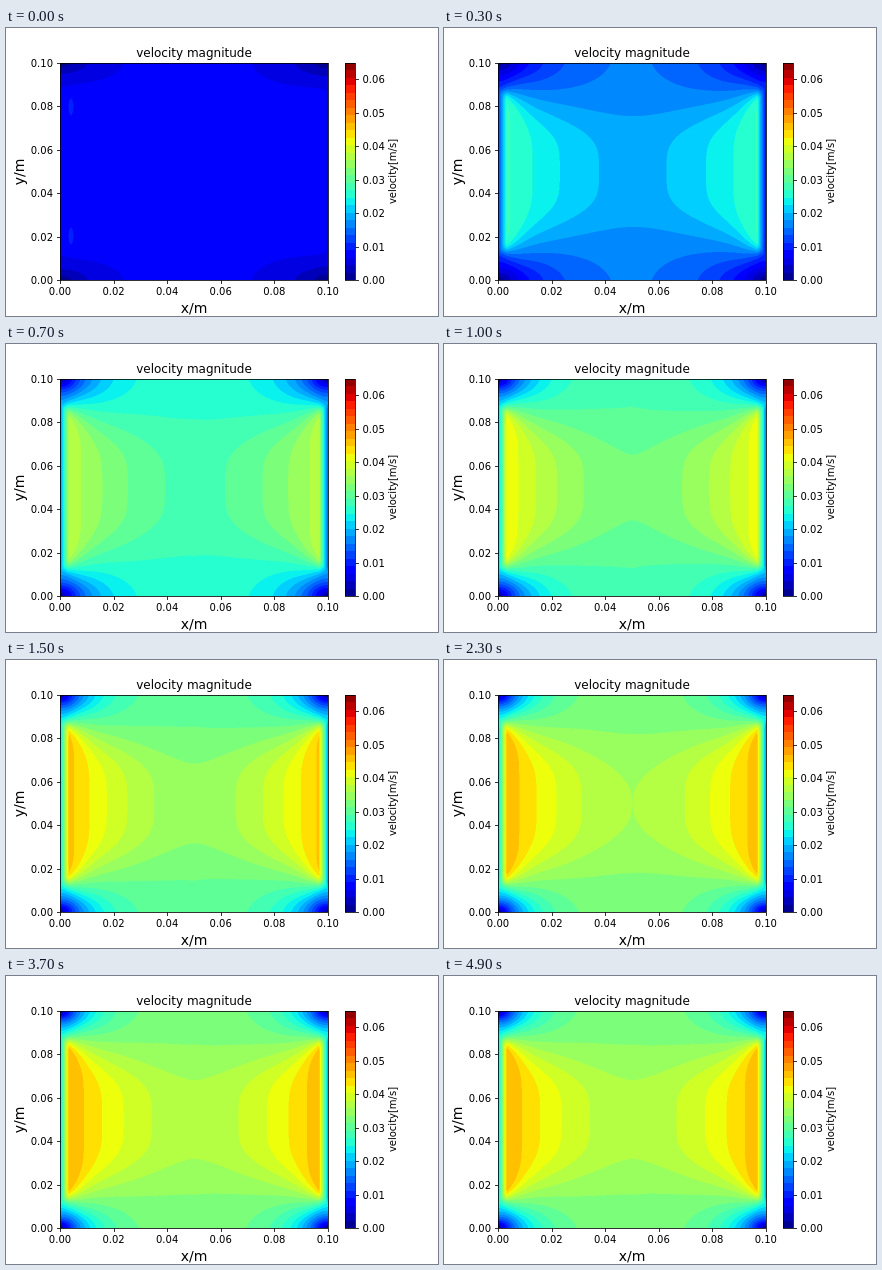
An HTML page with a canvas for the animation above (5 s loop, 432 px wide and 288 px high).

```html
<!DOCTYPE html>
<html lang="en">
<head>
<meta charset="utf-8">
<title>Velocity magnitude</title>
<style>
  html, body { margin: 0; width: 100%; height: 100%; overflow: hidden; background: #fff; }
  canvas { position: absolute; left: 54px; top: 35px; width: 268px; height: 217px; }
  svg { position: absolute; left: 0; top: 0; }
  text { font-family: "DejaVu Sans", sans-serif; font-size: 10px; fill: #000; }
</style>
</head>
<body>
<canvas id="field" width="536" height="434"></canvas>
<svg id="chart" width="432" height="288" viewBox="0 0 432 288"></svg>
<script>
const LOOP = 5000, STEP = 100, BANDS = 29, VMAX = 0.065;
const BOX = { left: 54, top: 34.56, right: 321.84, bottom: 252 };
const BAR = { left: 338.58, right: 349.45 };

// Piecewise linear curve through [position, value] points.
function ramp(points, t) {
  let i = 1;
  while (i < points.length - 1 && t > points[i][0]) i++;
  const [a, va] = points[i - 1], [b, vb] = points[i];
  return va + (vb - va) * Math.min(1, Math.max(0, (t - a) / (b - a)));
}

const JET = [
  [[0, 0], [0.35, 0], [0.66, 1], [0.89, 1], [1, 0.5]],
  [[0, 0], [0.125, 0], [0.375, 1], [0.64, 1], [0.91, 0], [1, 0]],
  [[0, 0.5], [0.11, 1], [0.34, 1], [0.65, 0], [1, 0]]
];
const colors = Array.from({ length: BANDS }, (_, i) =>
  JET.map(channel => Math.round(255 * ramp(channel, (i + 0.5) / BANDS))));

// Chart furniture; strokes sit on pixel centres.
const parts = [];
const snap = v => Math.round(v) + 0.5;
const line = (x1, y1, x2, y2) =>
  parts.push(`<path d="M${x1} ${y1}L${x2} ${y2}" stroke="#000" stroke-width=".8"/>`);
const label = (x, y, text, anchor = "middle", size = 10) =>
  parts.push(`<text x="${x}" y="${y}" text-anchor="${anchor}" style="font-size:${size}px">${text}</text>`);
const upright = (x, y, text, size) =>
  parts.push(`<text transform="translate(${x} ${y}) rotate(-90)" text-anchor="middle" style="font-size:${size}px">${text}</text>`);
const frame = (left, right) => {
  const x = snap(left), y = snap(BOX.top);
  parts.push(`<rect x="${x}" y="${y}" width="${snap(right) - x}" height="${snap(BOX.bottom) - y}" fill="none" stroke="#000" stroke-width=".8"/>`);
};

function buildChart() {
  const w = BOX.right - BOX.left, h = BOX.bottom - BOX.top;
  const base = snap(BOX.bottom), side = snap(BOX.left), barSide = snap(BAR.right);
  for (let i = 0; i <= 5; i++) {
    const x = BOX.left + w * i / 5, y = BOX.bottom - h * i / 5;
    const text = (i * 0.02).toFixed(2);
    line(snap(x), base, snap(x), base + 3.5);
    label(x, 267, text);
    line(side, snap(y), side - 3.5, snap(y));
    label(47, Math.round(y + 4.2), text, "end");
  }
  frame(BOX.left, BOX.right);
  colors.forEach((c, i) => {
    const top = BOX.bottom - h * (i + 1) / BANDS;
    parts.push(`<rect x="${BAR.left}" y="${top}" width="${BAR.right - BAR.left}" height="${h / BANDS}" fill="rgb(${c})" shape-rendering="crispEdges"/>`);
  });
  frame(BAR.left, BAR.right);
  for (let i = 0; i <= 6; i++) {
    const y = BOX.bottom - h * i * 0.01 / VMAX;
    line(barSide, snap(y), barSide + 3.5, snap(y));
    label(356.5, Math.round(y + 4.2), (i * 0.01).toFixed(2), "start");
  }
  label(188, 29, "velocity magnitude", "middle", 12);
  label(188, 285, "x/m", "middle", 14);
  upright(18, 144, "y/m", 14);
  upright(390, 143.5, "velocity[m/s]", 10);
  document.getElementById("chart").innerHTML = parts.join("");
}

// Flow state over time, in units of one colour band.
const STATES = [
  { t: 0, core: 3.55, lobe: 0.1, edge: 3.5, spread: 33, squash: 2.5, drop: 0.6 },
  { t: 300, core: 8.65, lobe: 3.9, edge: 7.5, spread: 42, squash: 1.7, drop: 7.5 },
  { t: 700, core: 12.68, lobe: 4.4, edge: 11.8, spread: 29, squash: 1.5, drop: 9.5 },
  { t: 1500, core: 15.3, lobe: 5.6, edge: 13.8, spread: 28, squash: 1.5, drop: 11.5 },
  { t: 2300, core: 16, lobe: 5.3, edge: 14.7, spread: 27, squash: 1.5, drop: 12 },
  { t: 3700, core: 16.3, lobe: 5.1, edge: 14.75, spread: 27, squash: 1.5, drop: 12 }
];
const settle = t => 1 - Math.exp(-t / 540);

function stateAt(t) {
  const state = {};
  for (const key of Object.keys(STATES[0]))
    state[key] = ramp(STATES.map(s => [settle(s.t), s[key]]), settle(t));
  return state;
}

const canvas = document.getElementById("field");
const ctx = canvas.getContext("2d");
const W = canvas.width, H = canvas.height, SCALE = 2;
const image = ctx.createImageData(W, H);
const HALF_W = 134, HALF_H = 108.5, LAYER = 9;

function paint(t) {
  const s = stateAt(t), data = image.data;
  const early = Math.exp(-t / 600), seed = Math.exp(-t / 40);
  const put = (x, y, c) => {
    const i = (y * W + x) * 4;
    data[i] = c[0]; data[i + 1] = c[1]; data[i + 2] = c[2]; data[i + 3] = 255;
  };
  for (let px = 0; px < W; px++) {
    const dx = (px + 0.5) / SCALE - HALF_W, right = dx > 0;
    const u = Math.abs(dx) / HALF_W, d = HALF_W * (1 - u);
    const drop = s.drop * (right ? 1.08 + 0.2 * early : 1);
    const mid = s.core + s.lobe * Math.pow(u, 1.75) - drop * Math.max(0, 1 - d / LAYER);
    const tilt = 0.1 * dx / HALF_W * s.core / 16;
    const reach = 58 + 24 * u * u;
    const power = 4 + 50 * Math.exp(-d / 9);
    const spread = s.spread * (right ? 1 + 0.17 * seed : 1);
    const floor = 1 / (1 + Math.pow(HALF_H / reach, power));
    const spot = right ? 0 : 0.9 * seed * Math.exp(-(((d - 11) / 2.5) ** 2));
    for (let py = 0; py < H / 2; py++) {
      const q = HALF_H - (py + 0.5) / SCALE;
      const r = Math.hypot(d, s.squash * (HALF_H - q));
      const outer = s.edge * (1 - Math.exp(-r / spread));
      const inner = (1 / (1 + Math.pow(q / reach, power)) - floor) / (1 - floor);
      let v = outer + (mid - outer) * inner - tilt;
      if (spot > 0.01) v += spot * Math.exp(-(((q - 65) / 9) ** 2));
      const c = colors[Math.max(0, Math.min(BANDS - 1, Math.floor(v)))];
      put(px, py, c);
      put(px, H - 1 - py, c);
    }
  }
  ctx.putImageData(image, 0, 0);
}

let shown = -1;
const start = performance.now();
function tick() {
  const t = Math.floor((performance.now() - start) % LOOP / STEP) * STEP;
  if (t !== shown) paint(shown = t);
  requestAnimationFrame(tick);
}
buildChart();
tick();
</script>
</body>
</html>
```
